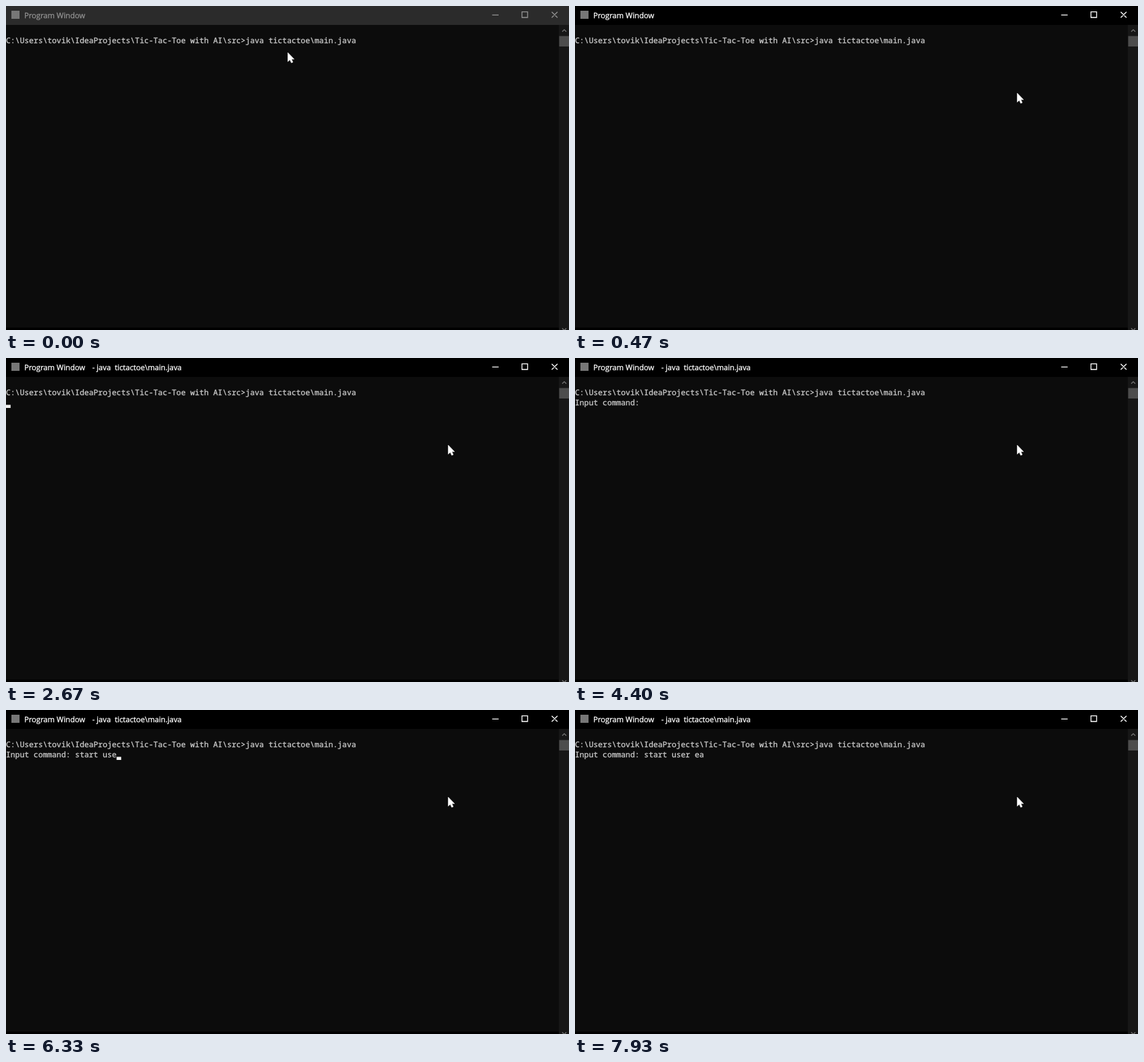
Write an HTML page that moves like this. It is 832 by 480 pixels and loops after 8 s.

```html
<!DOCTYPE html>
<html lang="en">
<head>
<meta charset="utf-8">
<title>Console</title>
<style>
  html, body { margin: 0; width: 100%; height: 100%; overflow: hidden; background: #0c0c0c; }
  svg { display: block; width: 832px; height: 480px; }
  text { white-space: pre; text-rendering: geometricPrecision; stroke-width: .3; }
  .title { font: 11.2px "Open Sans", sans-serif; fill: currentColor; stroke: currentColor; }
  .console { font: 11.35px "Noto Sans Mono", monospace; fill: #ccc; stroke: #ccc; }
  .buttons { fill: none; stroke: currentColor; stroke-width: 1.3; }
  .arrows { fill: none; stroke: #777; stroke-width: 1.2; }
</style>
</head>
<body>
<svg viewBox="0 0 832 480">
  <rect width="832" height="480" fill="#0c0c0c"/>
  <rect y="476.5" width="832" height="3.5" fill="#000"/>

  <g id="titleBar">
    <rect id="titleBack" width="832" height="28"/>
    <rect x="8" y="7" width="12" height="12" fill="#777"/>
    <text class="title" x="27" y="18">Program Window</text>
    <text class="title" id="titleSuffix" x="127.5" y="18">- java  tictactoe\main.java</text>
    <path class="buttons" d="M718.5 13.3h9.5M762.5 8.7h8.3v8.3h-8.3zM806.5 8.7l8.5 8.5m0-8.5l-8.5 8.5"/>
  </g>

  <rect x="817" y="28" width="15" height="452" fill="#171717"/>
  <rect x="817.5" y="44.5" width="14.5" height="15.5" fill="#4d4d4d"/>
  <path class="arrows" d="M822 38l3-3 3 3M822 477.5l3 3 3-3"/>

  <text class="console" x="0" y="55">C:\Users\tovik\IdeaProjects\Tic-Tac-Toe with AI\src&gt;java tictactoe\main.java</text>
  <text class="console" id="inputLine" x="0" y="70.3"></text>
  <rect id="caret" width="6.8" height="4.6" fill="#f2f2f2"/>
  <path id="pointer" d="M0 0V13.4L3 10.8 5.2 15.2 7.5 14.2 5.5 9.8H9.4z" fill="#fff" stroke="#fff" stroke-width=".5"/>
</svg>
<script>
const LOOP = 8000;
const CELL = 6.81;
const FRAME = 66.7;
const FOCUS_TIME = 470, ENTER_TIME = 1930, RUN_TIME = 2000, ASK_TIME = 4400;

const question = "Input command: ";
const answer = "start user ea";
const keyTimes = [4930, 5270, 5330, 5600, 5730, 5870, 6070, 6200, 6330, 6530, 6670, 7870, 7930];
const caretToggles = [530, 1070, 1600, 2130, 2670, 3200, 3730, 4270, 4930, 6870, 7400, 7930];

const el = id => document.getElementById(id);
const show = (node, visible) => node.setAttribute("visibility", visible ? "visible" : "hidden");
const countPassed = (times, t) => times.filter(time => t >= time).length;

function drawTitle(t) {
  const focused = t >= FOCUS_TIME;
  el("titleBar").style.color = focused ? "#fff" : "#929292";
  el("titleBack").setAttribute("fill", focused ? "#000" : "#2b2b2b");
  show(el("titleSuffix"), t >= RUN_TIME);
}

function drawConsole(t) {
  const line = t < ASK_TIME ? "" : question + answer.slice(0, countPassed(keyTimes, t));
  el("inputLine").textContent = line;
  const entered = t >= ENTER_TIME;
  const column = entered ? line.length : 76;
  el("caret").setAttribute("x", column * CELL);
  el("caret").setAttribute("y", entered ? 69.4 : 54.4);
  show(el("caret"), countPassed(caretToggles, t) % 2 === 1);
}

function drawPointer(t) {
  const p = Math.min(Math.floor((t + 5) / FRAME) / 6, 1);
  const eased = p * p * (3 - 2 * p);
  el("pointer").setAttribute("transform", `translate(${416.5 + 237 * eased} ${69 + 60 * eased})`);
}

function draw(now) {
  const t = now % LOOP;
  drawTitle(t);
  drawConsole(t);
  drawPointer(t);
}

const start = performance.now();
function tick() {
  draw(performance.now() - start);
  requestAnimationFrame(tick);
}
tick();
</script>
</body>
</html>
```
